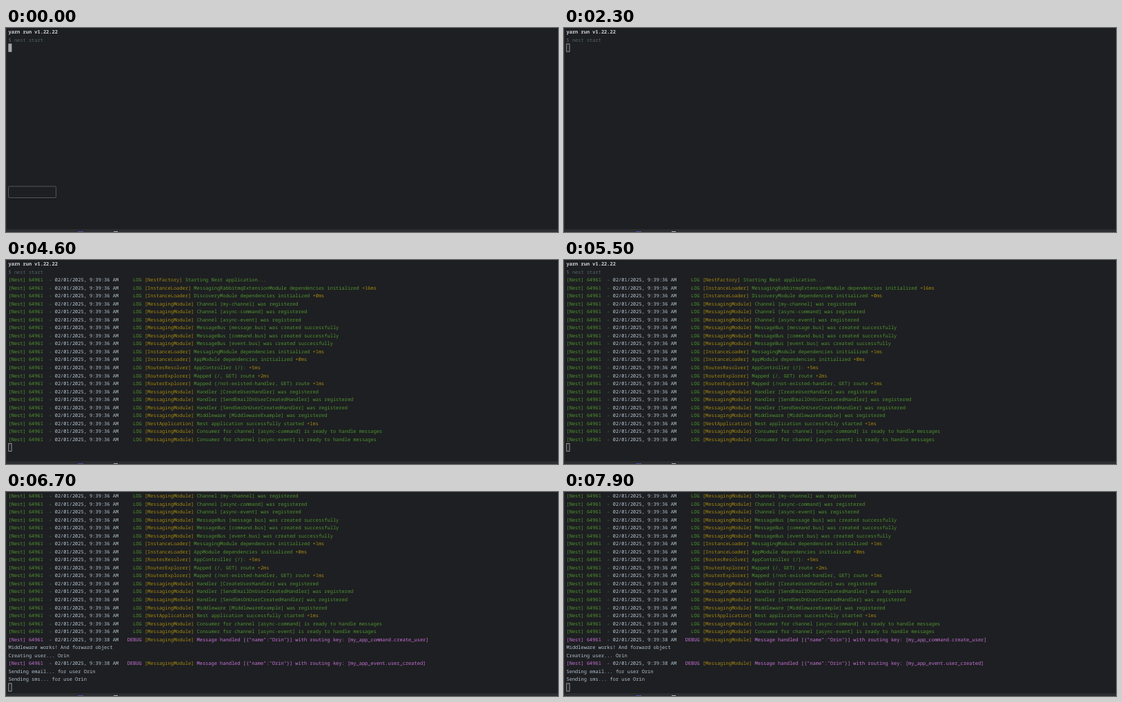
An HTML page for the animation above (8 s loop, 800 by 295 pixels).

```html
<!DOCTYPE html>
<html lang="en">
<head>
<meta charset="utf-8">
<title>Terminal</title>
<style>
html, body { margin: 0; width: 100%; height: 100%; overflow: hidden; background: #1e1f22; }
svg { display: block; width: 800px; height: 295px; }
text {
  font: 500 7px "Noto Sans Mono", "DejaVu Sans Mono", monospace;
  white-space: pre;
  text-rendering: geometricPrecision;
}
text.strong { font-weight: 700; }
</style>
</head>
<body>
<svg id="stage" viewBox="0 0 800 295">
  <rect width="800" height="295" fill="#1e1f22"/>
  <g id="lines"></g>
  <rect id="cursor" x="3.8" width="4.2" height="11.2"/>
  <g id="popup">
    <rect x="4" y="230" width="69" height="19" rx="2" fill="#17181a" opacity=".5"/>
    <rect x="3.5" y="229" width="69" height="16.5" rx="1.5" fill="#1e1f22" stroke="#5a5c60" stroke-width=".9"/>
  </g>
  <rect width="1" height="295" fill="#2b2d30"/>
  <rect y="291" width="800" height="4" fill="#2b2d30"/>
  <rect x="104" y="294" width="8" height="1" fill="#4a55a8"/>
  <rect x="156" y="294" width="6" height="1" fill="#b4b5b8"/>
</svg>
<script>
const LOOP = 8000;
const CELL = 4.2, PITCH = 11.54, LEFT = 3.5, BASELINE = 8;
const COLOR = {
  plain: '#b3c3cf', bright: '#d4d6da', dim: '#52646f',
  green: '#4f962f', yellow: '#a3890f', magenta: '#c873da'
};

const $ = id => document.getElementById(id);

function make(tag, attrs, parent) {
  const node = document.createElementNS('http://www.w3.org/2000/svg', tag);
  for (const key in attrs) node.setAttribute(key, attrs[key]);
  return parent.appendChild(node);
}

const rows = [];

// Parts are [column, color, text].
function addRow(...parts) {
  const y = rows.length * PITCH + BASELINE;
  const row = make('g', {}, $('lines'));
  for (const [column, color, text] of parts) {
    const node = make('text', { x: LEFT + column * CELL, y, fill: COLOR[color] }, row);
    node.textContent = text;
    if (color === 'bright') node.setAttribute('class', 'strong');
  }
  rows.push(row);
}

function addLog(context, message, level = 'LOG', second = 36) {
  const color = level === 'LOG' ? 'green' : 'magenta';
  const [, body, delay] = message.match(/^(.*?)( \+\d+ms)?$/);
  const start = 47 + context.length + 3;
  addRow(
    [0, color, '[Nest] 64961  -'],
    [16, 'plain', `02/01/2025, 9:39:${second} AM`],
    [46 - level.length, color, level],
    [47, 'yellow', `[${context}]`],
    [start, color, body],
    [start + body.length, 'yellow', delay || '']
  );
}

const messaging = message => addLog('MessagingModule', message);
const print = text => addRow([0, 'plain', text]);
const debug = key => addLog('MessagingModule',
  `Message handled [{"name":"Orin"}] with routing key: [${key}]`, 'DEBUG', 38);

addRow([0, 'bright', 'yarn run v1.22.22']);
addRow([0, 'dim', '$ nest start']);
addLog('NestFactory', 'Starting Nest application...');
addLog('InstanceLoader', 'MessagingRabbitmqExtensionModule dependencies initialized +16ms');
addLog('InstanceLoader', 'DiscoveryModule dependencies initialized +0ms');
for (const name of ['my-channel', 'async-command', 'async-event'])
  messaging(`Channel [${name}] was registered`);
for (const name of ['message', 'command', 'event'])
  messaging(`MessageBus [${name}.bus] was created successfully`);
addLog('InstanceLoader', 'MessagingModule dependencies initialized +1ms');
addLog('InstanceLoader', 'AppModule dependencies initialized +0ms');
addLog('RoutesResolver', 'AppController {/}: +5ms');
addLog('RouterExplorer', 'Mapped {/, GET} route +2ms');
addLog('RouterExplorer', 'Mapped {/not-existed-handler, GET} route +1ms');
for (const name of ['CreateUser', 'SendEmailOnUserCreated', 'SendSmsOnUserCreated'])
  messaging(`Handler [${name}Handler] was registered`);
messaging('Middleware [MiddlewareExample] was registered');
addLog('NestApplication', 'Nest application successfully started +1ms');
for (const name of ['command', 'event'])
  messaging(`Consumer for channel [async-${name}] is ready to handle messages`);
debug('my_app_command.create_user');
print('Middleware works! And forward object');
print('Creating user... Orin');
debug('my_app_event.user_created');
print('Sending email... for user Orin');
print('Sending sms... for use Orin');

// [time in ms, rows printed so far]
const OUTPUT = [[0, 2], [4500, 21], [4600, 23], [6500, 29]];
const VISIBLE_ROWS = 25;
const FOCUS_LOST = 100;

function render(t) {
  const printed = OUTPUT.filter(([time]) => time <= t).pop()[1];
  const scroll = Math.max(0, printed + 1 - VISIBLE_ROWS);
  rows.forEach((row, i) =>
    row.setAttribute('visibility', i >= scroll && i < printed ? 'visible' : 'hidden'));
  $('lines').setAttribute('transform', `translate(0 ${-scroll * PITCH})`);

  const focused = t < FOCUS_LOST;
  const cursor = $('cursor');
  cursor.setAttribute('y', (printed - scroll) * PITCH - 0.1);
  cursor.setAttribute('fill', focused ? '#a5a6a9' : 'none');
  cursor.setAttribute('stroke', focused ? '#a5a6a9' : '#b5b7bb');
  cursor.setAttribute('stroke-width', 0.8);
  $('popup').setAttribute('visibility', focused ? 'visible' : 'hidden');
}

const origin = performance.now();
function tick() {
  render((performance.now() - origin) % LOOP);
  requestAnimationFrame(tick);
}
render(0);
requestAnimationFrame(tick);
</script>
</body>
</html>
```
